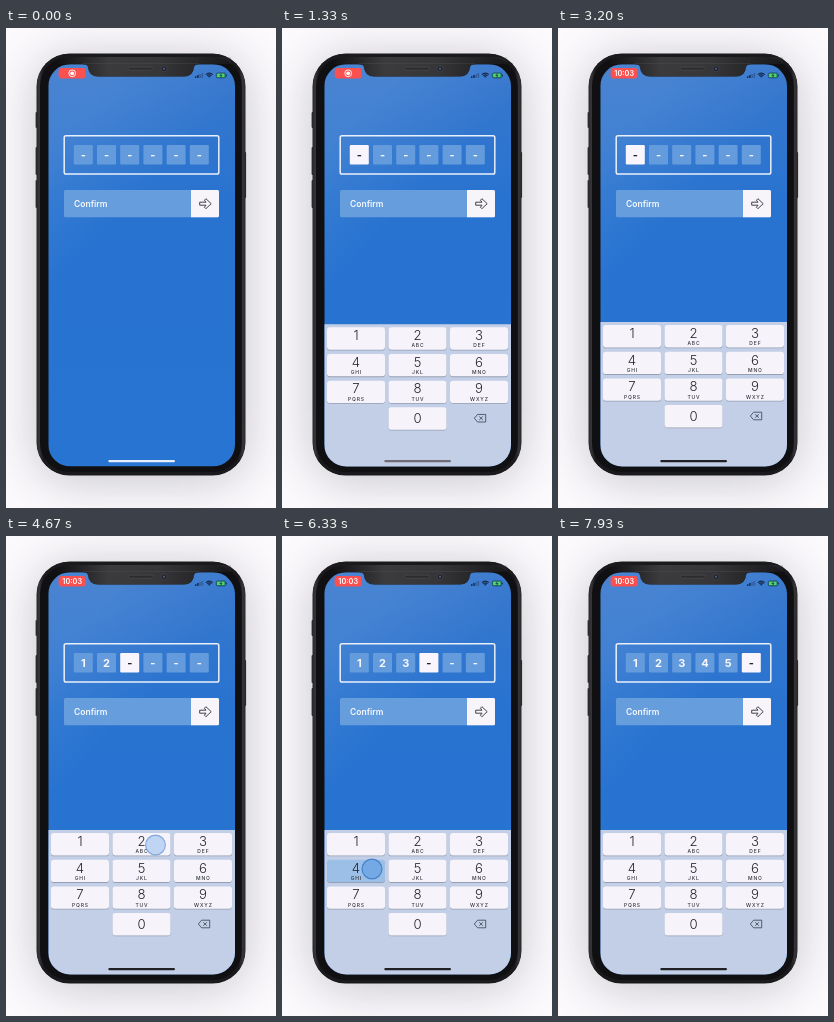
An HTML page with a canvas for the animation above (8 s loop, 270 by 480 pixels).

```html
<!DOCTYPE html>
<html lang="en">
<head>
<meta charset="utf-8">
<title>Code entry</title>
<style>
html, body { margin: 0; width: 100%; height: 100%; overflow: hidden; background: #fcfafd; }
canvas { display: block; width: 100%; height: 100%; }
</style>
</head>
<body>
<canvas id="stage"></canvas>
<script>
const W = 270, H = 480, LOOP = 8000;
const canvas = document.getElementById('stage');
const c = canvas.getContext('2d');
const FONT = 'Inter, Roboto, sans-serif';
const SCREEN = { x: 42.3, y: 36.2, w: 186.7, h: 402.3 };
const SCREEN_BOTTOM = SCREEN.y + SCREEN.h;
const KEY_X = [45, 106.5, 168], KEY_W = 58, KEY_H = 22.4;
const LETTERS = ['', 'ABC', 'DEF', 'GHI', 'JKL', 'MNO', 'PQRS', 'TUV', 'WXYZ'];
const KEYPAD_TOP = 294;
const FIELD_TAP = { t: 960, x: 77, y: 130 };
const KEY_TAPS = [
  { t: 3590, x: 88, y: 308.5 },
  { t: 4480, x: 149.5, y: 309 },
  { t: 5375, x: 210, y: 309 },
  { t: 6270, x: 90, y: 333 },
  { t: 7165, x: 151, y: 333 }
].map((tap, i) => ({ ...tap, key: i + 1 }));
const PRESS = 135;

const clamp = v => Math.max(0, Math.min(1, v));
const ramp = (t, a, b) => clamp((t - a) / (b - a));
const mix = (a, b, p) => a.map((v, i) => v + (b[i] - v) * p);
const rgb = v => `rgb(${v.map(Math.round).join(',')})`;

function paint(fill, stroke, line) {
  if (fill) { c.fillStyle = fill; c.fill(); }
  if (stroke) { c.strokeStyle = stroke; c.lineWidth = line; c.stroke(); }
}

function box(x, y, w, h, r, fill, stroke, line = 1) {
  c.beginPath();
  c.roundRect(x, y, w, h, r);
  paint(fill, stroke, line);
}

function disc(x, y, r, fill, stroke, line = 1) {
  c.beginPath();
  c.arc(x, y, r, 0, Math.PI * 2);
  paint(fill, stroke, line);
}

function path(points, color, line, close) {
  c.beginPath();
  points.forEach(([x, y]) => c.lineTo(x, y));
  if (close) c.closePath();
  c.lineJoin = 'round';
  paint(null, color, line);
}

function label(text, x, y, size, weight, color, align = 'center', spacing = 0) {
  c.font = `${weight} ${size}px ${FONT}`;
  c.letterSpacing = spacing + 'px';
  c.textAlign = align;
  c.fillStyle = color;
  c.fillText(text, x + spacing / 2, y);
}

function gradient(x0, y0, x1, y1, ...stops) {
  const g = c.createLinearGradient(x0, y0, x1, y1);
  stops.forEach(([p, color]) => g.addColorStop(p, color));
  return g;
}

function drawBody(scale) {
  c.fillStyle = '#fcfafd';
  c.fillRect(0, 0, W, H);
  c.save();
  c.shadowColor = 'rgba(40,35,50,.26)';
  c.shadowBlur = 50 * scale;
  c.shadowOffsetY = 5 * scale;
  box(31, 26, 208, 421, 32, '#151518');
  c.restore();

  for (const [y, h] of [[84, 16], [119, 28], [152, 28]]) box(29.6, y, 2, h, 1, '#2c2c2f');
  box(238.2, 124, 1.9, 46, 1, '#2c2c2f');
  const rim = gradient(30, 0, 240, 0, [0, '#252527'], [.015, '#363639'],
    [.035, '#1a1a1c'], [.965, '#1a1a1c'], [.985, '#363639'], [1, '#252527']);
  box(30.5, 25.5, 209, 422, 33, rim);
  box(34, 29, 201.8, 415, 29, '#101012');
}

function glassShine() {
  return gradient(50, 0, 225, 0, [0, 'rgba(70,70,72,0)'], [.3, 'rgba(70,70,72,.8)'],
    [.6, 'rgba(70,70,72,.7)'], [1, 'rgba(70,70,72,.15)']);
}

function drawStatus(t) {
  const clock = ramp(t, 1450, 1600);
  box(52.6, 40, 27, 10.6, 3, '#fa5050');
  c.globalAlpha = 1 - clock;
  disc(66.2, 45.3, 3.4, null, '#fff', .9);
  disc(66.2, 45.3, 1.9, '#fff');
  c.globalAlpha = clock;
  label('10:03', 66.2, 48, 7.3, 600, '#fff');
  c.globalAlpha = 1;

  const ink = '#14294b';
  for (let i = 0; i < 4; i++) {
    const h = 1.8 + i * 1.1;
    box(189 + i * 2.2, 50 - h, 1.5, h, .4, i < 2 ? ink : 'rgba(20,41,75,.35)');
  }
  for (const r of [1.2, 3, 4.8]) {
    c.beginPath();
    c.arc(203.3, 50, r, -Math.PI * .75, -Math.PI * .25);
    paint(null, ink, 1.3);
  }
  box(210.3, 45, 9.4, 4.9, 1.4, '#2f9b72', ink, .6);
  box(211.1, 45.8, 7, 3.3, .7, '#50d56a');
  box(220.2, 46.6, .8, 1.7, .4, ink);
  path([[215.5, 45.4], [213.9, 47.7], [216, 47.4], [214.5, 49.6]], ink, .7);
}

function drawForm(t) {
  box(58.2, 107.7, 154.6, 38.4, 1.8, null, '#e9f0fb', 1.5);
  const entered = KEY_TAPS.filter(tap => t >= tap.t + PRESS).length;
  const focus = ramp(t, 1010, 1150);
  for (let i = 0; i < 6; i++) {
    const x = 67.8 + i * 23.2;
    const active = i === entered ? focus : 0;
    box(x, 117, 19, 19.4, 1.2, rgb(mix([100, 155, 220], [248, 246, 252], active)));
    const text = i < entered ? String(i + 1) : '-';
    label(text, x + 9.5, 130.6, 11, 700, active > .5 ? '#202431' : '#f7f7fd');
  }

  box(58, 162, 155, 27.2, 1.5, '#659ddd');
  box(185, 162, 28, 27.2, [0, 1.5, 1.5, 0], '#f7f4fa');
  label('Confirm', 68, 178.8, 8.5, 600, '#f8f8fd', 'left');
  path([[193.7, 174.2], [200, 174.2], [198.4, 172.2], [199.9, 170.7], [205.2, 175.7],
    [199.9, 180.7], [198.4, 179.2], [200, 177.2], [193.7, 177.2]], '#24252c', .85, true);
}

function drawKey(n, x, y, pressed) {
  box(x, y + .8, KEY_W, KEY_H, 2.8, '#969fb3');
  box(x, y, KEY_W, KEY_H, 2.8, pressed ? '#9bbfe6' : '#f6f4fa');
  const mid = x + KEY_W / 2;
  label(String(n), mid, y + (n ? 12.8 : 15.7), 13.2, 350, '#26272e');
  if (n > 1) label(LETTERS[n - 1], mid, y + 20.2, 5, 500, '#33343c', 'center', .85);
}

function drawKeypad(t) {
  const p = ramp(t, 993, 1443);
  if (!p) return;
  c.save();
  c.translate(0, (SCREEN_BOTTOM - KEYPAD_TOP) * (1 - p) ** 3);
  c.fillStyle = '#c2cfe7';
  c.fillRect(SCREEN.x, KEYPAD_TOP, SCREEN.w, 146);
  const held = KEY_TAPS.find(tap => t >= tap.t && t < tap.t + PRESS);
  for (let n = 1; n <= 9; n++) {
    const row = Math.floor((n - 1) / 3);
    drawKey(n, KEY_X[(n - 1) % 3], 297 + row * 26.7, held && held.key === n);
  }
  drawKey(0, KEY_X[1], 377.1, false);
  const ink = '#3a4150';
  path([[192.3, 388], [195.6, 384.2], [203.7, 384.2], [203.7, 391.8], [195.6, 391.8]], ink, .8, true);
  path([[197.3, 386.3], [200.8, 389.7]], ink, .8);
  path([[200.8, 386.3], [197.3, 389.7]], ink, .8);
  c.restore();
}

function drawHomeBar(t) {
  let color = mix([232, 239, 250], [112, 108, 120], ramp(t, 1000, 1200));
  color = mix(color, [32, 32, 37], ramp(t, 1800, 2400));
  box(102.3, 432, 66.7, 2.3, 1.15, rgb(color));
}

function drawTouch(tap, t) {
  const age = t - tap.t;
  if (age < 0 || age > 300) return;
  c.globalAlpha = ramp(age, -20, 50) * (1 - ramp(age, 130, 300));
  disc(tap.x, tap.y, 9.9, 'rgba(82,150,228,.52)', 'rgba(52,116,198,.8)', 1.2);
  c.globalAlpha = 1;
}

function drawNotch() {
  const bottom = 48.6;
  c.beginPath();
  c.moveTo(77, 35);
  c.lineTo(77, 36.2);
  c.quadraticCurveTo(81.5, 36.2, 82, 39.5);
  c.quadraticCurveTo(83, bottom, 92, bottom);
  c.lineTo(178, bottom);
  c.quadraticCurveTo(187, bottom, 188, 39.5);
  c.quadraticCurveTo(188.5, 36.2, 193, 36.2);
  c.lineTo(193, 35);
  c.closePath();
  paint('#101012');
  paint(glassShine());
  c.fillStyle = glassShine();
  c.fillRect(50, 29, 175, 6.9);
  box(122.5, 39.2, 25, 3, 1.5, '#2c2c2f', '#555558', .5);
  disc(158, 40.8, 2.9, '#1d1e27', '#505058', .6);
  disc(158, 40.8, 1.2, '#4a5577');
}

function draw(t) {
  const scale = canvas.width / W;
  c.setTransform(scale, 0, 0, canvas.height / H, 0, 0);
  drawBody(scale);
  c.save();
  c.beginPath();
  c.roundRect(SCREEN.x, SCREEN.y, SCREEN.w, SCREEN.h, 22);
  c.clip();
  c.fillStyle = gradient(0, 36, 0, 438, [0, '#3878cd'], [.35, '#2873d0'], [1, '#2774d2']);
  c.fillRect(SCREEN.x, SCREEN.y, SCREEN.w, SCREEN.h);
  // Soft diagonal sheen across the upper glass
  c.fillStyle = gradient(45, 40, 155, 150, [0, 'rgba(255,255,255,.09)'],
    [.35, 'rgba(255,255,255,.09)'], [1, 'rgba(255,255,255,0)']);
  c.fillRect(SCREEN.x, SCREEN.y, SCREEN.w, 260);
  drawStatus(t);
  drawForm(t);
  drawKeypad(t);
  drawHomeBar(t);
  [FIELD_TAP, ...KEY_TAPS].forEach(tap => drawTouch(tap, t));
  c.restore();
  drawNotch();
}

function resize() {
  const dpr = window.devicePixelRatio || 1;
  canvas.width = Math.round(innerWidth * dpr);
  canvas.height = Math.round(innerHeight * dpr);
}

const start = performance.now();
function tick() {
  draw((performance.now() - start) % LOOP);
  requestAnimationFrame(tick);
}
addEventListener('resize', resize);
resize();
tick();
</script>
</body>
</html>
```
